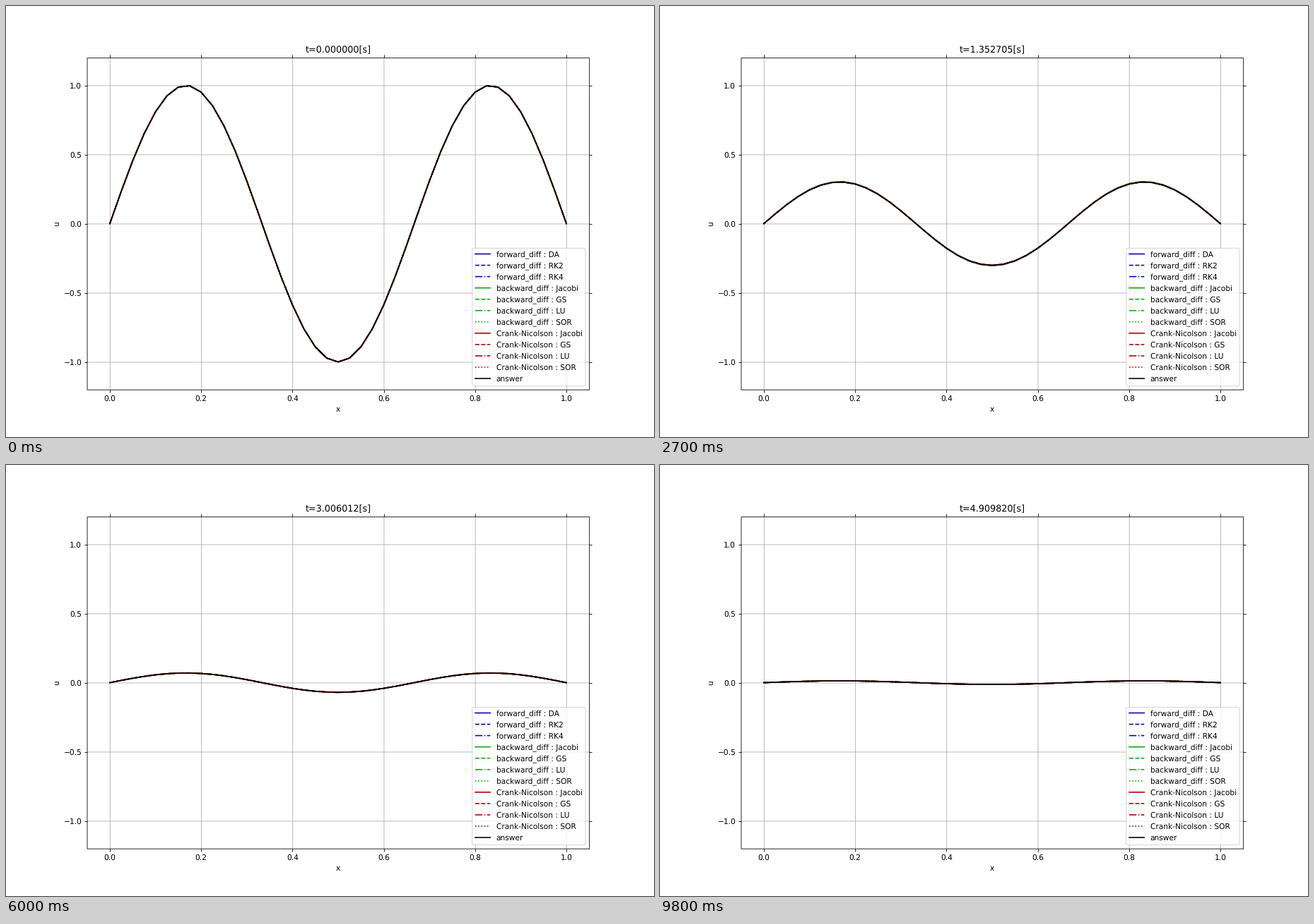
A matplotlib script that plays this animation: 917x611 px, repeating every 9900 ms.

```python
import numpy as np
import matplotlib.pyplot as plt
from matplotlib.animation import FuncAnimation
from matplotlib.lines import Line2D
from matplotlib.patches import FancyBboxPatch, Rectangle
from matplotlib.transforms import Affine2D

W, H, DPI = 917, 611, 76.4
FRAMES, INTERVAL = 99, 100
EM = 10 * DPI / 72            # legend font size in pixels

# Heat equation u_t = a u_xx on 41 points, five time steps per picture
ALPHA, DX, DT, STEPS = 0.01, 1 / 40, 5 / 499, 5
K = 3 * np.pi
RATE = ALPHA * (2 / DX * np.sin(K * DX / 2)) ** 2
Z = RATE * DT

BLUE, GREEN, RED = "#0000aa", "#00aa00", "#aa0000"
BACKWARD = 1 / (1 + Z)
CRANK = (1 - Z / 2) / (1 + Z / 2)
EXACT = np.exp(-ALPHA * K ** 2 * DT)

# label, colour, line style, damping per time step
SCHEMES = [
    ("forward_diff : DA", BLUE, "-", 1 - Z),
    ("forward_diff : RK2", BLUE, "--", 1 - Z + Z ** 2 / 2),
    ("forward_diff : RK4", BLUE, "-.",
     1 - Z + Z ** 2 / 2 - Z ** 3 / 6 + Z ** 4 / 24),
    ("backward_diff : Jacobi", GREEN, "-", BACKWARD),
    ("backward_diff : GS", GREEN, "--", BACKWARD),
    ("backward_diff : LU", GREEN, "-.", BACKWARD),
    ("backward_diff : SOR", GREEN, ":", BACKWARD),
    ("Crank-Nicolson : Jacobi", RED, "-", CRANK),
    ("Crank-Nicolson : GS", RED, "--", CRANK),
    ("Crank-Nicolson : LU", RED, "-.", CRANK),
    ("Crank-Nicolson : SOR", RED, ":", CRANK),
    ("answer", "black", "-", EXACT),
]

plt.rcParams["font.family"] = "DejaVu Sans"
plt.rcParams["text.hinting"] = "no_hinting"

# The tiny surplus keeps the pixel size from being rounded down
fig = plt.figure(figsize=((W + 0.001) / DPI, (H + 0.001) / DPI), dpi=DPI,
                 facecolor="white")
ax = fig.add_axes([0.125, 0.11, 0.775, 0.77])
ax.set(xlim=(-0.05, 1.05), ylim=(-1.2, 1.2), ylabel="u")
ax.set_xlabel("x", labelpad=4.4)
x_ticks, y_ticks = np.linspace(0, 1, 6), np.linspace(-1, 1, 5)
ax.set_xticks(x_ticks)
ax.set_yticks(y_ticks)
ax.tick_params(top=True, right=True)
title = ax.set_title("t=0.000000[s]", pad=6.5)


def draw_grid_and_frame():
    """Soft, unsnapped straight lines, set a fraction of a pixel off."""
    shift = Affine2D().translate(0.38, -0.38)
    grid = dict(colors="#b0b0b0", linewidths=0.8, snap=False, zorder=1.5,
                transform=ax.transData + shift)
    ax.vlines(x_ticks, *ax.get_ylim(), **grid)
    ax.hlines(y_ticks, *ax.get_xlim(), **grid)
    ax.set(xlim=(-0.05, 1.05), ylim=(-1.2, 1.2))
    ax.spines[:].set_visible(False)
    ax.add_artist(Rectangle((0, 0), 1, 1, fill=False, edgecolor="black",
                            linewidth=0.8, snap=False, clip_on=False,
                            zorder=2.5, transform=ax.transAxes + shift))


def draw_legend(left=659.8, right=820.0, top=343.4, bottom=538.6,
                first=351.5, pitch=16.05):
    """Legend laid out in pixels, measured from the top left corner."""
    pixels = Affine2D().scale(1, -1).translate(0, H)
    ax.add_artist(FancyBboxPatch(
        (left, top), right - left, bottom - top,
        boxstyle=f"round,pad=0,rounding_size={0.2 * EM}",
        facecolor="white", edgecolor="0.8", alpha=0.8, linewidth=1,
        transform=pixels, clip_on=False, zorder=5))
    start = left + 0.4 * EM
    for row, (label, color, style, _) in enumerate(SCHEMES):
        y = first + row * pitch
        ax.add_artist(Line2D([start, start + 2 * EM], [y, y], color=color,
                             ls=style, snap=False, transform=pixels,
                             clip_on=False, zorder=6))
        ax.text(start + 2.8 * EM, y + 0.35 * EM, label, fontsize=10,
                va="baseline", transform=pixels, zorder=6)


draw_grid_and_frame()
draw_legend()

x = np.linspace(0, 1, 41)
shape = np.sin(K * x)
curves = [ax.plot(x, shape, color=color, ls=style)[0]
          for _, color, style, _ in SCHEMES]


def update(i):
    steps = STEPS * i
    for curve, (_, _, _, factor) in zip(curves, SCHEMES):
        curve.set_ydata(shape * factor ** steps)
    title.set_text(f"t={steps * DT:.6f}[s]")
    return [*curves, title]


anim = FuncAnimation(fig, update, frames=FRAMES, interval=INTERVAL,
                     repeat=True, repeat_delay=0, blit=False)
plt.show()
```
